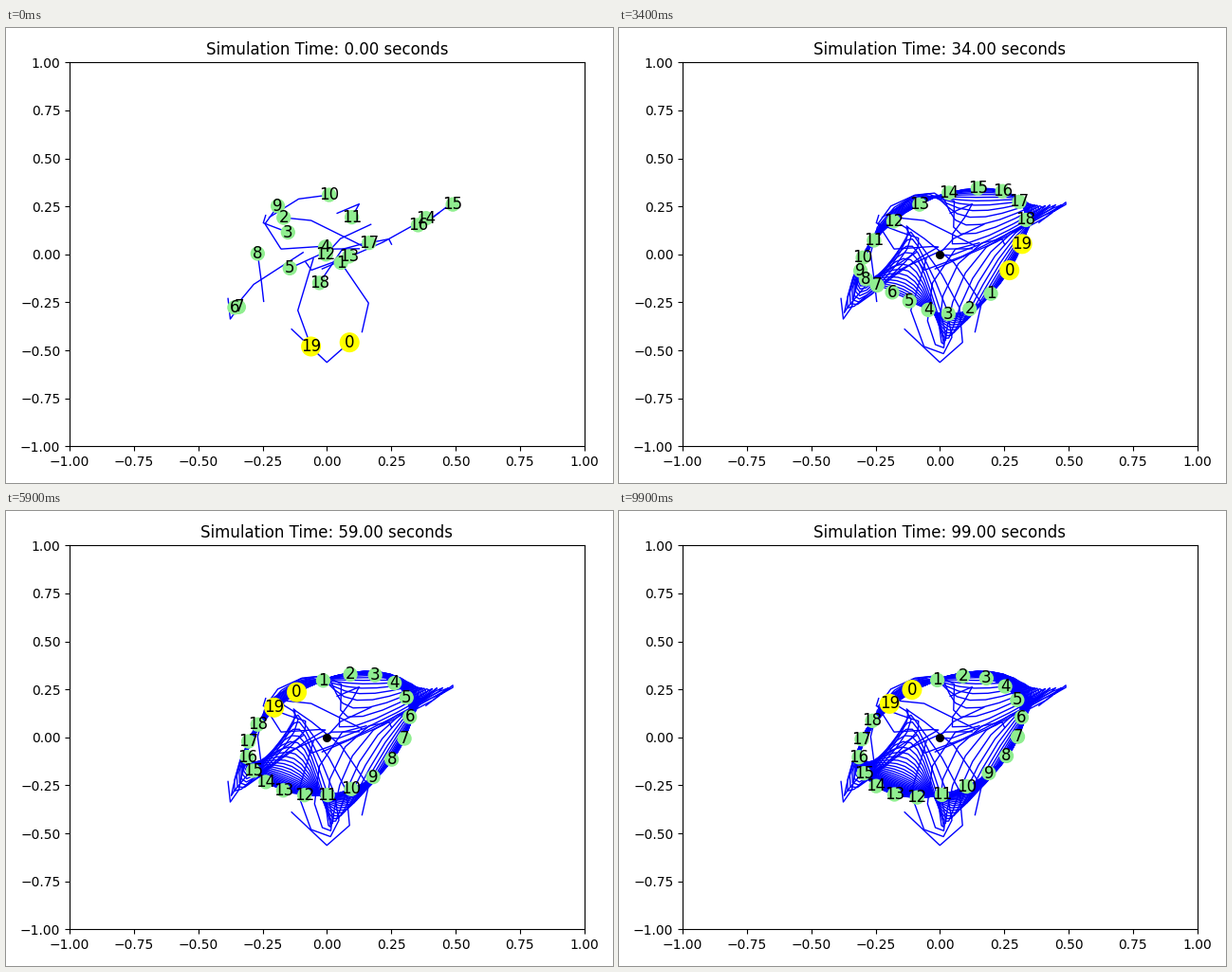
A matplotlib script that plays this animation: 640 px wide and 480 px high, repeating every 10 s.

```python
import numpy as np
import matplotlib.pyplot as plt
from matplotlib.animation import FuncAnimation

COUNT = 20
FRAMES = 100
WARMUP = 2  # averaging steps already taken when the clock starts


def wave(amps, phases):
    """Closed curve sampled at each agent, as a sum of its low harmonics."""
    turn = 2 * np.pi * np.arange(COUNT) / COUNT
    return sum(a * np.cos(m * turn - p)
               for m, (a, p) in enumerate(zip(amps, phases), 1))


def step(p):
    """Move every agent to the midpoint with its successor, then renormalise."""
    p = (p + np.roll(p, -1, axis=0)) / 2
    return p / np.linalg.norm(p, axis=0)


def simulate():
    x = wave([0.207, 0.084, 0.065, 0.130, 0.051, 0.137],
             [-1.072, 2.993, -3.112, 1.280, 1.385, -2.960])
    y = wave([0.095, 0.079, 0.191, 0.010, 0.081, 0.093],
             [-2.336, 2.591, -2.785, 1.610, -2.185, -1.906])
    path = [np.column_stack([x, y])]
    for _ in range(FRAMES + WARMUP - 1):
        path.append(step(path[-1]))
    return np.array(path)


path = simulate()

fig, ax = plt.subplots(figsize=(6.4, 4.8), dpi=100)
ax.set_xlim(-1, 1)
ax.set_ylim(-1, 1)
title = ax.set_title("Simulation Time: 0.00 seconds")
fig.tight_layout()
fig.subplots_adjust(top=fig.subplotpars.top + 1 / 480)

trails = [ax.plot([], [], color="blue", lw=1, zorder=2)[0] for _ in range(COUNT)]
ax.plot(0, 0, "o", color="black", ms=5.5, zorder=2.2)

is_end = np.isin(np.arange(COUNT), (0, COUNT - 1))
nodes = ax.scatter(*path[0].T, s=np.where(is_end, 200, 100),
                   c=np.where(is_end, "yellow", "lightgreen"),
                   linewidths=1, zorder=2.5)
labels = [ax.text(0, 0, str(i), size=12, ha="center", va="center", zorder=3)
          for i in range(COUNT)]


def update(frame):
    now = frame + WARMUP
    for i, (trail, label) in enumerate(zip(trails, labels)):
        trail.set_data(*path[:now + 1, i].T)
        label.set_position(path[now, i])
    nodes.set_offsets(path[now])
    title.set_text(f"Simulation Time: {frame:.2f} seconds")
    return [*trails, nodes, *labels, title]


anim = FuncAnimation(fig, update, frames=FRAMES, interval=100, repeat=True,
                     repeat_delay=0)
plt.show()
```
